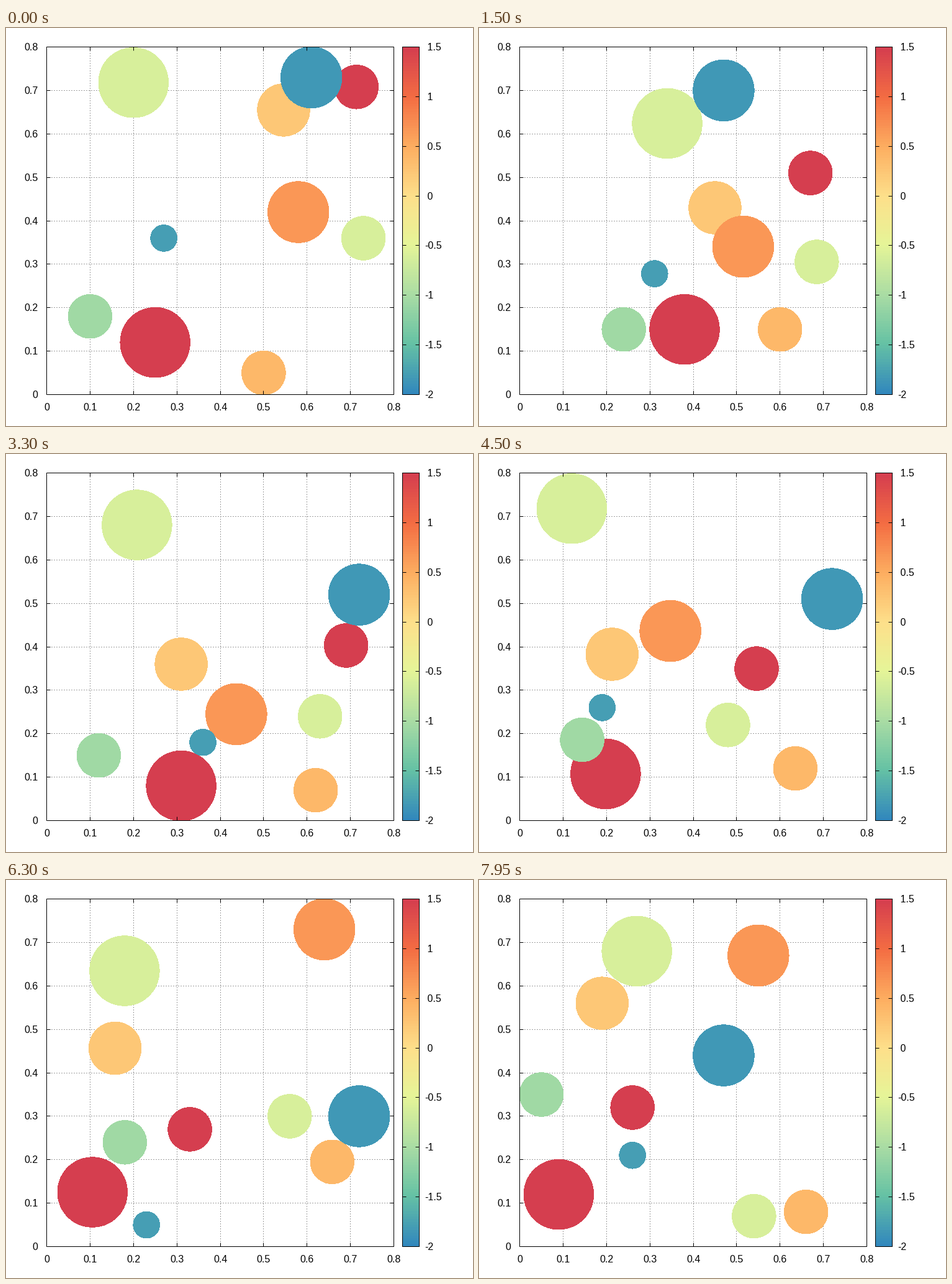
Recreate the animation shown at these times as a matplotlib script. Size 752 by 640 pixels, loop 8000 ms.

```python
import math

import numpy as np
import matplotlib.pyplot as plt
from matplotlib.animation import FuncAnimation
from matplotlib.colors import LinearSegmentedColormap
from matplotlib.patches import Circle, Rectangle

WIDTH, HEIGHT, DPI = 752, 640, 100
PX = 72 / DPI                       # one pixel in points
LEFT, RIGHT, TOP, BOTTOM = 65.5, 624.5, 30.5, 589.5
BAR_LEFT, BAR_RIGHT = 638.5, 665.5
SCALE = (RIGHT - LEFT) / 0.8
VMIN, VMAX = -2.0, 1.5
TICK = 6
TICK_MS, STEP_MS, LOOP_MS = 50, 150, 8000

plt.rcParams["font.family"] = "Liberation Sans"
spectral = LinearSegmentedColormap.from_list("spectral", [
    "#3288bd", "#66c2a5", "#abdda4", "#e6f598",
    "#fee08b", "#fdae61", "#f46d43", "#d53e4f"])

fig = plt.figure(figsize=(WIDTH / DPI, HEIGHT / DPI), dpi=DPI, facecolor="white")
ax = fig.add_axes([0, 0, 1, 1])
ax.axis("off")


def to_px(x, y):
    return LEFT + SCALE * x, BOTTOM - SCALE * y


def pixel_center(v):
    return math.floor(v) + 0.5


def line(x0, y0, x1, y1, **style):
    style = {"color": "black", "zorder": 5, **style}
    ax.plot([x0, x1], [y0, y1], lw=PX, solid_capstyle="butt",
            dash_capstyle="butt", snap=False, **style)


def label(x, y, text, align):
    ax.text(x, math.floor(y) + 6, text, ha=align, va="baseline", fontsize=16 * PX)


def box(x0, x1):
    ax.add_patch(Rectangle((x0, TOP), x1 - x0, BOTTOM - TOP, fill=False,
                           ec="black", lw=PX, zorder=5, snap=False))


def side_ticks(x0, x1, y):
    line(x0, y, x0 + TICK, y)
    line(x1, y, x1 - TICK, y)


def draw_axes():
    grid = dict(color="#a0a0a0", linestyle=(0, (2, 2)), zorder=1)
    for i in range(9):
        x, y = map(pixel_center, to_px(i / 10, i / 10))
        if 0 < i < 8:
            line(x, BOTTOM + 0.5, x, TOP, **grid)
            line(LEFT - 0.5, y, RIGHT, y, **grid)
            line(x, BOTTOM, x, BOTTOM - TICK)
            line(x, TOP, x, TOP + TICK)
            side_ticks(LEFT, RIGHT, y)
        label(x, 609, f"{i / 10:g}", "center")
        label(51.5, y, f"{i / 10:g}", "right")
    box(LEFT, RIGHT)


def draw_color_bar():
    ax.imshow(np.linspace(1, 0, 128)[:, None], cmap=spectral, vmin=0, vmax=1,
              extent=(BAR_LEFT, BAR_RIGHT, BOTTOM, TOP), aspect="auto",
              interpolation="nearest", zorder=2)
    for value in np.arange(VMIN, VMAX + 0.1, 0.5):
        share = (value - VMIN) / (VMAX - VMIN)
        y = pixel_center(BOTTOM - share * (BOTTOM - TOP))
        side_ticks(BAR_LEFT, BAR_RIGHT, y)
        label(674.5, y, f"{value: g}", "left")
    box(BAR_LEFT, BAR_RIGHT)


class Ball:
    """Disc drifting straight between turns (step, x, y), lengths in hundredths."""

    def __init__(self, radius, value, *turns):
        self.steps, self.xs, self.ys = np.transpose(turns)
        color = spectral((value - VMIN) / (VMAX - VMIN))
        self.disc = Circle((0, 0), radius / 100 * SCALE + 0.3, fc=color,
                           ec="none", lw=0, antialiased=False, zorder=3)
        ax.add_patch(self.disc)

    def move(self, step):
        x, y = (np.interp(step, self.steps, v) / 100 for v in (self.xs, self.ys))
        self.disc.center = to_px(x, y)


draw_axes()
draw_color_bar()

balls = [
    Ball(8, 1.5, (0, 25, 12), (10, 38, 15), (22, 31, 8), (36, 11.4, 12.8), (53, 9, 12)),
    Ball(8, -0.63, (0, 20, 71.8), (10, 34, 62.4), (30, 12, 71.8), (36, 13, 61), (53, 27, 68)),
    Ball(6, 0.25, (0, 54.6, 65.5), (10, 45, 43), (22, 31, 36), (36, 14, 40), (53, 19, 56)),
    Ball(7, 0.67, (0, 58, 42), (22, 43.7, 24.5), (36, 28, 58), (42, 64, 73), (53, 55, 67)),
    Ball(5, 1.5, (0, 71.4, 70.8), (10, 67, 51), (22, 69, 40.3), (42, 33, 27), (53, 26, 32)),
    Ball(5, -0.63, (0, 73, 36), (22, 63, 24), (30, 48, 22), (42, 56, 30), (53, 54, 7)),
    Ball(5, -1.08, (0, 10, 18), (10, 24, 15), (22, 12, 15), (42, 18, 24), (53, 5, 35)),
    Ball(5, 0.4, (0, 50, 5), (10, 60, 15), (22, 62, 7), (42, 65.8, 19.5), (53, 66, 8)),
    Ball(3, -1.8, (0, 27, 36), (22, 36, 18), (30, 19, 26), (42, 23, 5), (53, 26, 21)),
    Ball(7, -1.85, (0, 61, 73), (10, 47, 70), (22, 72, 52), (30, 72, 51), (42, 72, 30),
         (53, 47, 44)),
]

ax.set_xlim(0, WIDTH)
ax.set_ylim(HEIGHT, 0)


def update(tick):
    for ball in balls:
        ball.move(tick * TICK_MS // STEP_MS)
    return [ball.disc for ball in balls]


anim = FuncAnimation(fig, update, frames=LOOP_MS // TICK_MS, interval=TICK_MS,
                     repeat=True, repeat_delay=0)
plt.show()
```
